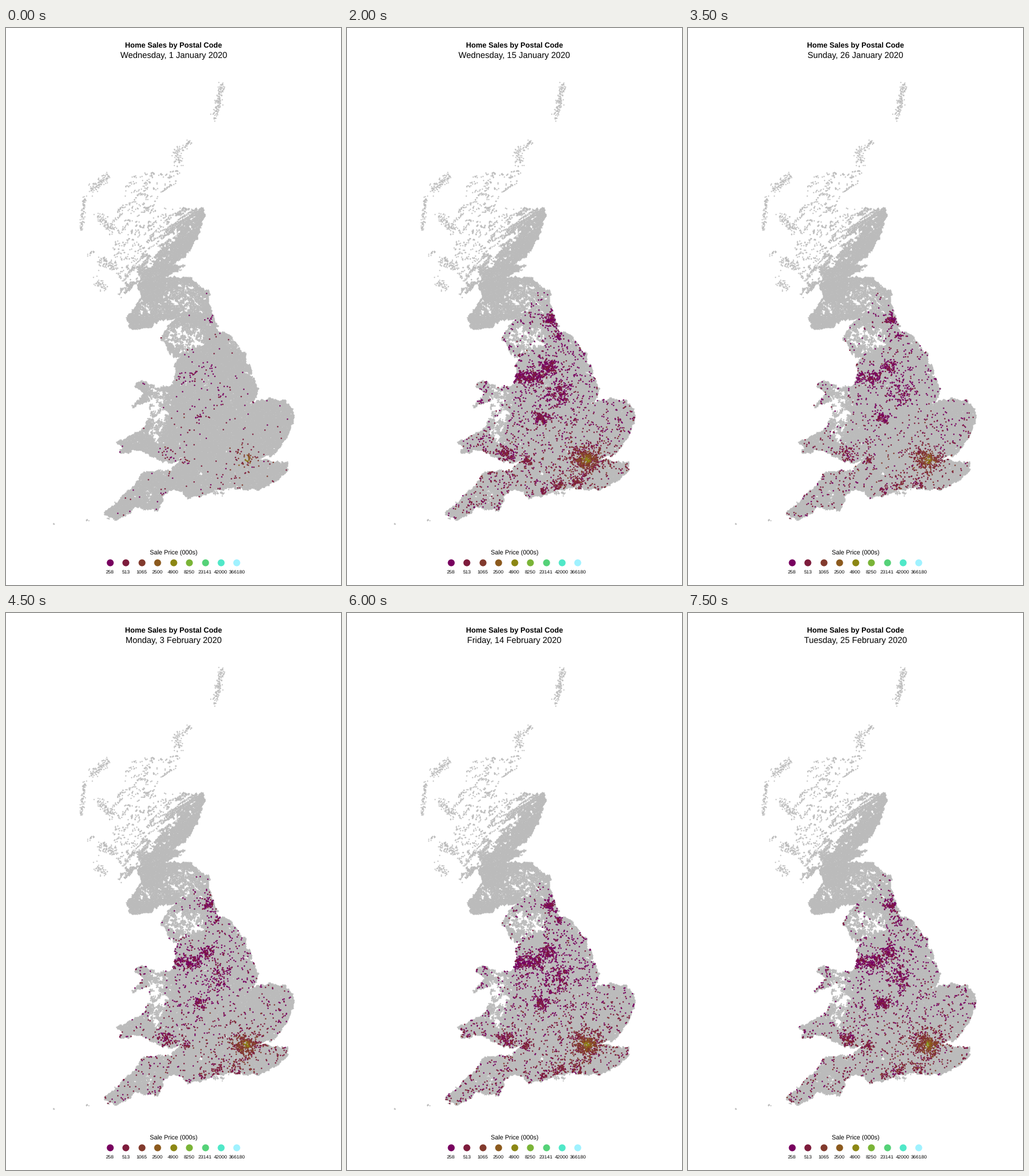
Write a matplotlib script that moves like this. It is 580 px wide and 966 px high and loops after 8000 ms.

```python
import numpy as np
import matplotlib.pyplot as plt
from matplotlib.animation import FuncAnimation
from matplotlib.path import Path

W, H, DPI = 580, 966, 100
PX = 72 / DPI
FRAMES, INTERVAL = 16, 500
GREY = "#bbbbbb"

plt.rcParams["font.family"] = "Liberation Sans"
plt.rcParams["text.hinting"] = "none"

# Key points of the coast, roughened below
SCOTLAND = [
    (220, 253), (275, 247), (297, 247), (295, 263), (253, 299), (266, 299),
    (247, 321), (280, 312), (338, 312), (344, 325), (325, 373), (308, 396),
    (286, 409), (312, 412), (272, 431), (318, 433), (335, 447), (306, 500),
    (264, 506), (241, 521), (216, 523), (207, 502), (222, 486), (235, 466),
    (224, 441), (190, 477), (202, 438), (166, 398), (184, 384), (192, 355),
    (183, 335), (204, 300), (205, 278)]
ENGLAND_WALES = [
    (335, 447), (350, 457), (355, 492), (366, 523), (392, 537), (407, 560),
    (416, 564), (411, 572), (427, 599), (402, 592), (427, 604), (436, 622),
    (434, 640), (421, 653), (440, 643), (480, 644), (496, 662), (497, 682),
    (482, 713), (463, 738), (430, 746), (488, 752), (486, 768), (464, 787),
    (436, 800), (390, 797), (362, 801), (340, 809), (316, 815), (300, 801),
    (282, 799), (270, 811), (264, 836), (224, 831), (191, 853), (168, 844),
    (203, 810), (225, 786), (238, 767), (284, 768), (312, 735), (287, 756),
    (258, 743), (226, 731), (194, 736), (203, 726), (191, 718), (238, 695),
    (248, 672), (249, 646), (217, 657), (240, 634), (222, 620), (232, 611),
    (260, 622), (286, 618), (292, 604), (292, 580), (301, 569), (285, 569),
    (268, 535), (282, 510), (304, 499)]

# Small isles: x0, y0, x1, y1, spread
ISLES = [
    (374, 96, 361, 157, 3), (297, 234, 296, 210, 4), (304, 209, 319, 196, 2),
    (178, 254, 146, 282, 3.5), (136, 292, 130, 350, 1.8), (160, 324, 186, 352, 4),
    (142, 391, 151, 388, 1.4), (162, 406, 188, 412, 4), (158, 438, 170, 450, 4),
    (358, 805, 378, 807, 2), (138, 852, 141, 854, .9), (82, 860, 83, 860, .3)]

# Thinly settled ground: x, y, rx, ry, white share
MOORS = [
    (305, 470, 38, 26, .36), (255, 488, 28, 14, .28), (310, 538, 34, 22, .50),
    (392, 548, 14, 7, .30), (345, 612, 6, 9, .45), (262, 665, 18, 48, .55),
    (246, 807, 7, 10, .50), (336, 768, 10, 6, .28)]

# Busy towns: x, y, spread, share of sales in percent
TOWNS = [
    (416, 747, 13, 18), (322, 607, 9, 7), (298, 606, 6, 3), (349, 589, 7, 5),
    (366, 632, 12, 6), (337, 676, 6, 5), (352, 506, 6, 4), (366, 532, 4, 1),
    (278, 741, 9, 4), (311, 750, 4, 2), (366, 792, 7, 2), (341, 801, 4, 1),
    (398, 796, 10, 2)]

LEGEND = [
    ("258", "#78005f"), ("513", "#7e1c3c"), ("1065", "#823a2d"),
    ("2500", "#8c5a1e"), ("4900", "#8c8714"), ("8250", "#7ab437"),
    ("23141", "#55d278"), ("42000", "#50e8c8"), ("366180", "#a0f2ff")]
PALETTE = np.array([color for _, color in LEGEND])

DAYS = ["Wednesday", "Thursday", "Friday", "Saturday", "Sunday", "Monday", "Tuesday"]

rng = np.random.default_rng(7)
Y, X = np.mgrid[:H, :W]


def blur(a, sx, sy=None, turn=0):
    """Gaussian blur, optionally stretched along a turned axis."""
    sy = sx if sy is None else sy
    fx, fy = np.fft.fftfreq(W), np.fft.fftfreq(H)[:, None]
    c, s = np.cos(turn), np.sin(turn)
    u, v = fx * c + fy * s, fy * c - fx * s
    kernel = np.exp(-2 * np.pi**2 * ((u * sx)**2 + (v * sy)**2))
    return np.fft.ifft2(np.fft.fft2(a) * kernel).real


def rank(a):
    """Spread values evenly over 0..1."""
    r = np.empty(a.size)
    r[a.argsort(axis=None)] = np.linspace(0, 1, a.size)
    return r.reshape(a.shape)


def noise(*args):
    return rank(blur(rng.standard_normal((H, W)), *args))


def bell(x, y, cx, cy, s):
    return np.exp(-((x - cx)**2 + (y - cy)**2) / (2 * s * s))


def rise(t):
    return 1 / (1 + np.exp(-t))


def wobble():
    return 4 * (noise(2.2) - .5) + 2 * (noise(1) - .5)


warp = np.c_[(X + wobble()).ravel(), (Y + wobble()).ravel()]


def inside(shape):
    return Path(shape).contains_points(warp).reshape(H, W)


scotland, sold_in = inside(SCOTLAND), inside(ENGLAND_WALES)
land = scotland | sold_in
edge = land & (blur(land, 2.5) < .78)

# Empty ground grows towards the north west, and on the moors
lowland = np.minimum(((X - 225) * 140 + (Y - 450) * 115) / 181, X - 225)
wild = .82 * rise(-(lowland + 14) / 9) * (1 - .3 * edge)
white = np.where(scotland & (Y < 482), wild, .008)
for x, y, rx, ry, amount in MOORS:
    r2 = ((X - x) / rx)**2 + ((Y - y) / ry)**2
    white = np.maximum(white, amount * np.exp(-r2**2))

grain = rank(noise(2.1) + .7 * noise(1))
glens = rank(-np.abs(noise(7, 1.8, -.55) - .5) + .3 * noise(1.1))
texture = np.where(scotland & (Y < 440), glens, grain)

# Postcode points on a jittered grid
gx, gy = np.meshgrid(np.arange(150, 510), np.arange(240, 870))
pts = np.c_[gx.ravel(), gy.ravel()] + rng.uniform(.2, .8, (gx.size, 2))
ix, iy = pts.astype(int).T
keep = land[iy, ix] & (texture[iy, ix] > white[iy, ix])
keep &= rng.random(len(pts)) > .95 * white[iy, ix]
homes = pts[keep]

isles = []
for x0, y0, x1, y1, spread in ISLES:
    length = np.hypot(x1 - x0, y1 - y0)
    n = int(3 + length * (.5 + .55 * spread))
    along = rng.random((n, 1))
    line = np.array([x0, y0]) * (1 - along) + np.array([x1, y1]) * along
    isles.append(line + rng.normal(0, spread, (n, 2)))
isles = np.concatenate(isles)

# Where sales happen and what they cost
ix, iy = homes.astype(int).T
market = homes[sold_in[iy, ix]]
ix, iy = market.astype(int).T
mx, my = market.T
clump = noise(1.8)[iy, ix]**2
base = clump * (1 + 1.8 * edge[iy, ix]) * (1 - white[iy, ix])
weight = 42 * base / base.sum()
for x, y, s, share in TOWNS:
    near = bell(mx, my, x, y, s) * (.15 + clump)
    weight += share * near / near.sum()
weight /= weight.sum()

price = .1 + .55 * rise((my - 705) / 15)
for spread, extra in ((60, .5), (12, 1.0), (3.5, 1.8)):
    price += extra * bell(mx, my, 416, 748, spread)

fig = plt.figure(figsize=(W / DPI, H / DPI), dpi=DPI, facecolor="white")
ax = fig.add_axes([0, 0, 1, 1])
ax.set(xlim=(0, W), ylim=(H, 0))
ax.axis("off")


def label(x, y, text, size, **kw):
    return ax.text(x, y, text, fontsize=size * PX, ha="center", va="baseline",
                   color="black", **kw)


def dots(xy, size, color=GREY):
    ax.plot(*np.transpose(xy), "o", ms=size * PX, mew=0, color=color)


dots(homes, 2.2)
dots(isles, 2.1)
sales = ax.scatter([], [], s=(2.5 * PX)**2, linewidths=0, zorder=3)

label(290, 34, "Home Sales by Postal Code", 12.8, weight="bold")
date = label(290, 52.3, "", 14.6)
label(290, 914, "Sale Price (000s)", 10.7)
for i, (text, color) in enumerate(LEGEND):
    x = 180 + 27.43 * i
    dots([(x, 927)], 12, color)
    label(x, 946, text, 8.5)


def update(k):
    day = 1 + 11 * k // 3
    month, number = ("January", day) if day <= 31 else ("February", day - 31)
    weekday = (day - 1) % 7
    date.set_text(f"{DAYS[weekday]}, {number} {month} 2020")

    # Trade peaks midweek, dips on Sunday and rests on New Year's Day
    pick = np.random.default_rng(100 + k)
    n = 340 if day == 1 else int(2700 + 800 * np.cos(2 * np.pi * (weekday - .8) / 7))
    sold = pick.choice(len(market), n, replace=False, p=weight)
    level = np.rint(price[sold] + pick.normal(0, .5, n)).clip(0, 8).astype(int)
    order = level.argsort(kind="stable")
    sales.set_offsets(market[sold][order])
    sales.set_facecolor(PALETTE[level[order]])
    return sales, date


anim = FuncAnimation(fig, update, frames=FRAMES, interval=INTERVAL, repeat=True)
plt.show()
```
